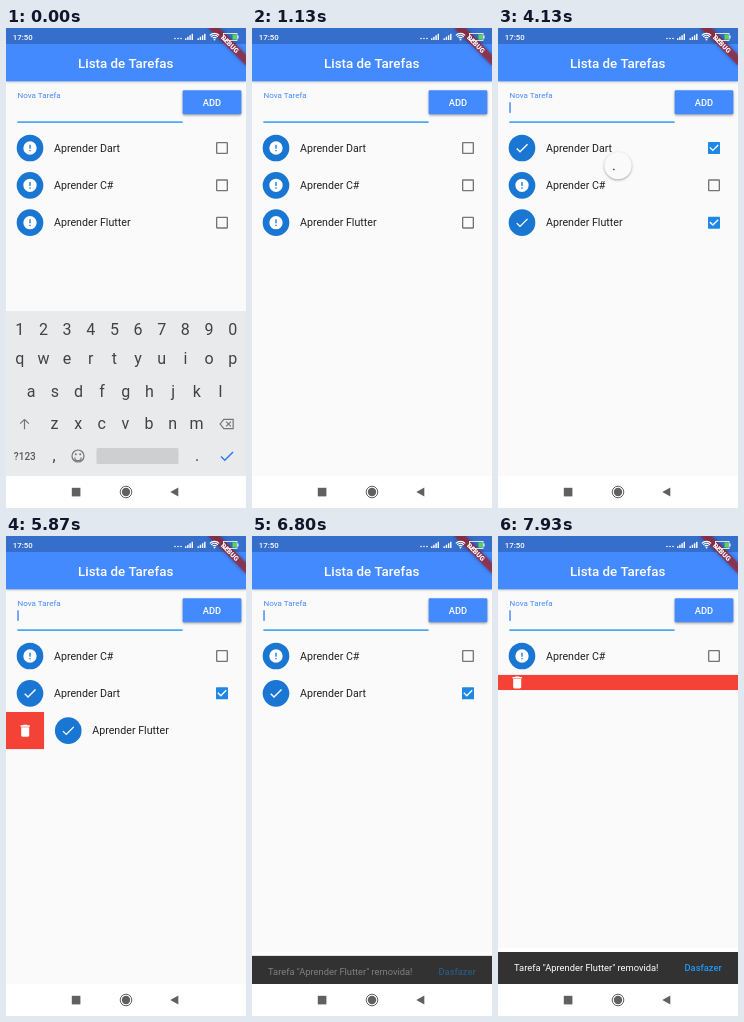
These frames come from a looping animation (240x480 px, 8000 ms). An HTML page with a canvas:

```html
<!DOCTYPE html>
<html lang="pt">
<head>
<meta charset="utf-8">
<title>Lista de Tarefas</title>
<style>
html, body { margin: 0; width: 100%; height: 100%; overflow: hidden; background: #fafafa; }
canvas { display: block; width: 240px; height: 480px; }
</style>
</head>
<body>
<canvas id="stage"></canvas>
<script>
const LOOP = 8000, W = 240, H = 480, DP = 2 / 3;
const ROW_H = 56 * DP, LIST_TOP = 101.33, NAV_Y = 448;
const BLUE = '#448aff', FONT = 'Roboto, "Noto Sans", sans-serif';

const canvas = document.getElementById('stage');
const c = canvas.getContext('2d');
const ratio = window.devicePixelRatio || 1;
canvas.width = W * ratio;
canvas.height = H * ratio;

const clamp = (v, a = 0, b = 1) => Math.min(b, Math.max(a, v));
const span = (t, a, b) => clamp((t - a) / (b - a));

function bezier(x1, y1, x2, y2) {
  const at = (a, b, s) => 3 * a * s * (1 - s) ** 2 + 3 * b * s * s * (1 - s) + s ** 3;
  return x => {
    let lo = 0, hi = 1;
    for (let i = 0; i < 20; i++) {
      const mid = (lo + hi) / 2;
      if (at(x1, x2, mid) < x) lo = mid; else hi = mid;
    }
    return at(y1, y2, lo);
  };
}
const ease = bezier(0.25, 0.1, 0.25, 1);
const fastOutSlowIn = bezier(0.4, 0, 0.2, 1);

const ICONS = {
  check: new Path2D('M9 16.17L4.83 12l-1.42 1.41L9 19 21 7l-1.41-1.41z'),
  error: new Path2D('M12 2a10 10 0 1 0 0 20a10 10 0 1 0 0-20zM11 7h2v6h-2zM11 15h2v2h-2z'),
  trash: new Path2D('M6 19c0 1.1.9 2 2 2h8c1.1 0 2-.9 2-2V7H6v12zM19 4h-3.5l-1-1h-5l-1 1H5v2h14V4z'),
  shift: new Path2D('M12 5L5.5 11.5M12 5l6.5 6.5M12 5.5V20'),
  erase: new Path2D('M8 5h14v14H8L2.5 12zM11.5 8.5l7 7M18.5 8.5l-7 7')
};

function rect(x, y, w, h, color) {
  c.fillStyle = color;
  c.fillRect(x, y, w, h);
}

function disc(x, y, r, color) {
  c.fillStyle = color;
  c.beginPath();
  c.arc(x, y, r, 0, 7);
  c.fill();
}

function text(str, x, y, size, color, weight = 400, align = 'left') {
  c.font = `${weight} ${size}px ${FONT}`;
  c.textAlign = align;
  c.fillStyle = color;
  c.fillText(str, x, y);
}

function line(points, color, width) {
  c.strokeStyle = color;
  c.lineWidth = width;
  c.beginPath();
  points.forEach(([x, y]) => c.lineTo(x, y));
  c.stroke();
}

function shadow(color, blur, dy) {
  c.shadowColor = color;
  c.shadowBlur = blur * ratio;
  c.shadowOffsetY = dy * ratio;
}

// 24-unit icon centred on x, y
function icon(name, x, y, color, stroke = 0) {
  c.save();
  c.translate(x - 8, y - 8);
  c.scale(DP, DP);
  if (stroke) {
    c.strokeStyle = color;
    c.lineWidth = stroke;
    c.stroke(ICONS[name]);
  } else {
    c.fillStyle = color;
    c.fill(ICONS[name], 'evenodd');
  }
  c.restore();
}

function clipped(x, y, w, h, draw) {
  c.save();
  c.beginPath();
  c.rect(x, y, w, h);
  c.clip();
  draw();
  c.restore();
}

function drawHeader() {
  shadow('rgba(0,0,0,.3)', 3, 1);
  rect(0, 16, W, 37.33, BLUE);
  shadow('transparent', 0, 0);
  rect(0, 0, W, 16, '#366ecc');
  text('Lista de Tarefas', 119.7, 40, 13.33, '#fff', 500, 'center');
}

function drawBanner() {
  c.save();
  c.translate(W, 0);
  c.rotate(Math.PI / 4);
  shadow('rgba(0,0,0,.5)', 4, 0);
  rect(-26.67, 18.67, 53.33, 8, 'rgba(183,28,28,.63)');
  shadow('transparent', 0, 0);
  text('DEBUG', 0, 25.1, 6.8, '#fff', 900, 'center');
  c.restore();
}

function drawStatus() {
  text('17:50', 6.8, 11.5, 7.8, '#fff', 500);
  for (let i = 0; i < 3; i++) disc(169 + i * 3, 10.5, 0.8, '#fff');
  for (const x of [179, 191.5])
    for (let i = 0; i < 4; i++) rect(x + i * 2.2, 10.3 - i * 1.5, 1.4, 1.7 + i * 1.5, '#fff');
  c.strokeStyle = '#fff';
  c.lineWidth = 1.1;
  for (const r of [2.6, 4.6, 6.6]) {
    c.beginPath();
    c.arc(208.5, 12, r, -2.36, -0.78);
    c.stroke();
  }
  disc(208.5, 11.6, 0.9, '#fff');
  c.lineWidth = 0.8;
  c.strokeRect(217.5, 5.5, 13.5, 7);
  rect(231.4, 7.5, 1.1, 3, '#fff');
  rect(226.5, 6.4, 4, 5.2, '#5bd64a');
}

const cursorOn = t =>
  [[600, 1130], [1600, 2000], [2530, 3000], [3530, 4190], [4600, 5000],
   [5530, 6060], [6600, 7060], [7530, LOOP]].some(([a, b]) => t >= a && t < b);

function drawForm(t) {
  text('Nova Tarefa', 11.5, 70.3, 8, BLUE);
  rect(11.33, 93.4, 165.3, 1.4, '#2196f3');
  if (cursorOn(t)) rect(11.33, 74.3, 1.4, 10.6, '#4285f4');
  shadow('rgba(0,0,0,.35)', 2.5, 1.2);
  c.fillStyle = BLUE;
  c.beginPath();
  c.roundRect(176.67, 62.2, 58.67, 24, 1.3);
  c.fill();
  shadow('transparent', 0, 0);
  text('ADD', 206, 77.6, 9.33, '#fff', 500, 'center');
}

function drawCheckbox(x, y, done) {
  c.beginPath();
  if (!done) {
    c.strokeStyle = '#757575';
    c.lineWidth = 1.33;
    c.roundRect(x - 5.33, y - 5.33, 10.67, 10.67, 0.4);
    c.stroke();
    return;
  }
  c.fillStyle = '#1e88e5';
  c.roundRect(x - 6, y - 6, 12, 12, 0.7);
  c.fill();
  line([[x - 4.2, y - 0.6], [x - 1.2, y + 2.4], [x + 4.2, y - 3]], '#fff', 1.33);
}

function drawTile(task, y, dx) {
  disc(24 + dx, y, 13.33, '#1976d2');
  icon(task.done ? 'check' : 'error', 24 + dx, y, '#fff');
  text(task.name, 48 + dx, y + 3.8, 10.67, '#212121');
  drawCheckbox(216 + dx, y, task.done);
}

// horizontal travel of a dismissed tile; it leaves the stage 470 ms after 'at'
function swipeX(t, at, lead) {
  const s = t - at;
  if (s < 0) return lead ? 38 * span(s, -lead, 0) : 0;
  return Math.min(W, 38 + 0.25 * s + 0.000382 * s * s);
}

const SWIPES = {
  Flutter: { at: 5870, lead: 0, shrink: 6350 },
  Dart: { at: 7270, lead: 70, shrink: 7750 }
};

function drawRow(key, task, top, t) {
  const s = SWIPES[key], y = top + ROW_H / 2;
  const dx = s ? swipeX(t, s.at, s.lead) : 0;
  if (s && t >= s.shrink) {
    const h = ROW_H * (1 - ease(span(t, s.shrink + 120, s.shrink + 300)));
    clipped(0, top, W, h, () => {
      rect(0, top, W, h, '#f44336');
      icon('trash', 19.2, top + h / 2, '#fff');
    });
    return;
  }
  if (dx > 0) clipped(0, top, dx, ROW_H, () => {
    rect(0, top, dx, ROW_H, '#f44336');
    icon('trash', 19.2, y, '#fff');
  });
  if (key === 'Dart' && t >= 7200 && t < 7600) {
    const fade = 0.1 * (1 - span(t, 7400, 7600));
    clipped(dx, top, W, ROW_H, () =>
      disc(83 + dx, y + 0.7, 4 + 11 * span(t, 7200, 7400), `rgba(0,0,0,${fade})`));
  }
  drawTile(task, y, dx);
}

function drawList(t) {
  const done = { Dart: t >= 1600, 'C#': false, Flutter: t >= 2200 };
  const order = t < 4470 ? ['Dart', 'C#', 'Flutter'] : ['C#', 'Dart', 'Flutter'];
  order.forEach((key, i) => {
    if (key === 'Flutter' && t >= 6650) return;
    drawRow(key, { name: 'Aprender ' + key, done: done[key] }, LIST_TOP + i * ROW_H, t);
  });
}

function drawRefresh(t) {
  if (t < 2995 || t > 4670) return;
  const PULL = 3200, SPIN = 3350, DONE = 4470, top = 94.67;
  const pull = t < PULL ? 1.25 * Math.sin(span(t, 2960, PULL) * Math.PI / 2)
                        : 1.25 - 0.25 * ease(span(t, PULL, SPIN));
  const spinning = t >= SPIN;
  const value = pull / 2;
  const phase = spinning ? 0.25 + (t - SPIN) / 1000 : value / 2;
  const step = Math.floor(phase), rot = phase - step;
  const head = fastOutSlowIn(clamp(rot * 2)), tail = fastOutSlowIn(clamp(rot * 2 - 1));
  const start = Math.PI * (-0.5 + 1.5 * tail + 1.7 * rot - 0.8 * step);
  const end = start + Math.max(0.001, 1.5 * Math.PI * (head - tail));
  const scale = 1 - span(t, DONE, 4670), ink = '#2c3e50', r = 5.67;

  clipped(0, top, W, 130, () => {
    c.translate(120, top + (89 * pull - 24.5) * DP);
    c.scale(scale, scale);
    shadow('rgba(0,0,0,.35)', 2.5, 0.9);
    disc(0, 0, 13.67, '#fafafa');
    shadow('transparent', 0, 0);
    c.globalAlpha = clamp(pull);
    c.strokeStyle = ink;
    c.lineWidth = 1.33;
    c.lineCap = spinning ? 'square' : 'butt';
    c.beginPath();
    c.arc(0, 0, r, start, end);
    c.stroke();
    if (!spinning) {
      const k = clamp(value * 2), a = 2 * k, ux = Math.cos(end), uy = Math.sin(end);
      c.fillStyle = ink;
      c.beginPath();
      c.moveTo(ux * (r - a), uy * (r - a));
      c.lineTo(ux * (r + a), uy * (r + a));
      c.lineTo(ux * r - uy * 2.67 * k, uy * r + ux * 2.67 * k);
      c.fill();
    }
  });
}

function drawSnackbar(t) {
  if (t < 6650) return;
  const h = 32 * fastOutSlowIn(span(t, 6650, 6900)), y = NAV_Y - h;
  clipped(0, y - 4, W, h + 4, () => {
    rect(0, y - 4, W, 4, '#fff');
    rect(0, y, W, h, '#323232');
    c.globalAlpha = span(t, 6740, 6900);
    text('Tarefa "Aprender Flutter" removida!', 16, y + 19.4, 9.33, '#fff');
    text('Dasfazer', 186.5, y + 19.4, 9.33, '#2196f3', 500);
  });
}

function keys(str, x, y) {
  [...str].forEach((k, i) => text(k, x + i * 23.65, y, 16, '#424242', 400, 'center'));
}

function drawKeyboard(t) {
  if (t >= 930) return;
  const dy = 165 * span(t, 540, 930) ** 1.5, gray = '#757575';
  clipped(0, 283, W, NAV_Y - 283, () => {
    c.translate(0, dy);
    rect(0, 283, W, 165, '#e9eaeb');
    keys('1234567890', 13.8, 306.8);
    keys('qwertyuiop', 13.8, 336.3);
    keys('asdfghjkl', 25.2, 368.5);
    keys('zxcvbnm', 48.5, 401);
    icon('shift', 18.5, 396, gray, 1.8);
    icon('erase', 220.5, 396, gray, 1.8);
    text('?123', 18.8, 431.6, 10, '#5a5a5a', 500, 'center');
    text(',', 48, 432.5, 16, '#424242', 400, 'center');
    text('.', 191, 432.5, 16, '#424242', 400, 'center');
    c.strokeStyle = gray;
    c.lineWidth = 1.2;
    c.beginPath();
    c.arc(72, 428, 6, 0, 7);
    c.moveTo(75.2, 429.5);
    c.arc(72, 429.5, 3.2, 0, Math.PI);
    c.stroke();
    disc(69.8, 426.2, 1, gray);
    disc(74.2, 426.2, 1, gray);
    c.fillStyle = '#cecfd0';
    c.beginPath();
    c.roundRect(90.5, 420, 82, 16, 1.5);
    c.fill();
    line([[215, 428.5], [218.8, 432.3], [227, 424]], '#2b7de9', 1.5);
  });
}

function drawNav() {
  const gray = '#606060';
  rect(0, NAV_Y, W, H - NAV_Y, '#fff');
  rect(65.8, 459.8, 8.6, 8.6, gray);
  disc(120, 464, 4.2, gray);
  c.strokeStyle = gray;
  c.lineWidth = 1;
  c.beginPath();
  c.arc(120, 464, 5.8, 0, 7);
  c.stroke();
  c.fillStyle = gray;
  c.beginPath();
  c.moveTo(164.3, 464);
  c.lineTo(172.3, 459.6);
  c.lineTo(172.3, 468.4);
  c.fill();
}

function draw(t) {
  c.setTransform(ratio, 0, 0, ratio, 0, 0);
  rect(0, 0, W, H, '#fafafa');
  drawList(t);
  drawRefresh(t);
  drawForm(t);
  drawHeader();
  drawSnackbar(t);
  drawBanner();
  drawStatus();
  drawKeyboard(t);
  drawNav();
}

const began = performance.now();
function frame() {
  draw((performance.now() - began) % LOOP);
  requestAnimationFrame(frame);
}
frame();
</script>
</body>
</html>
```
